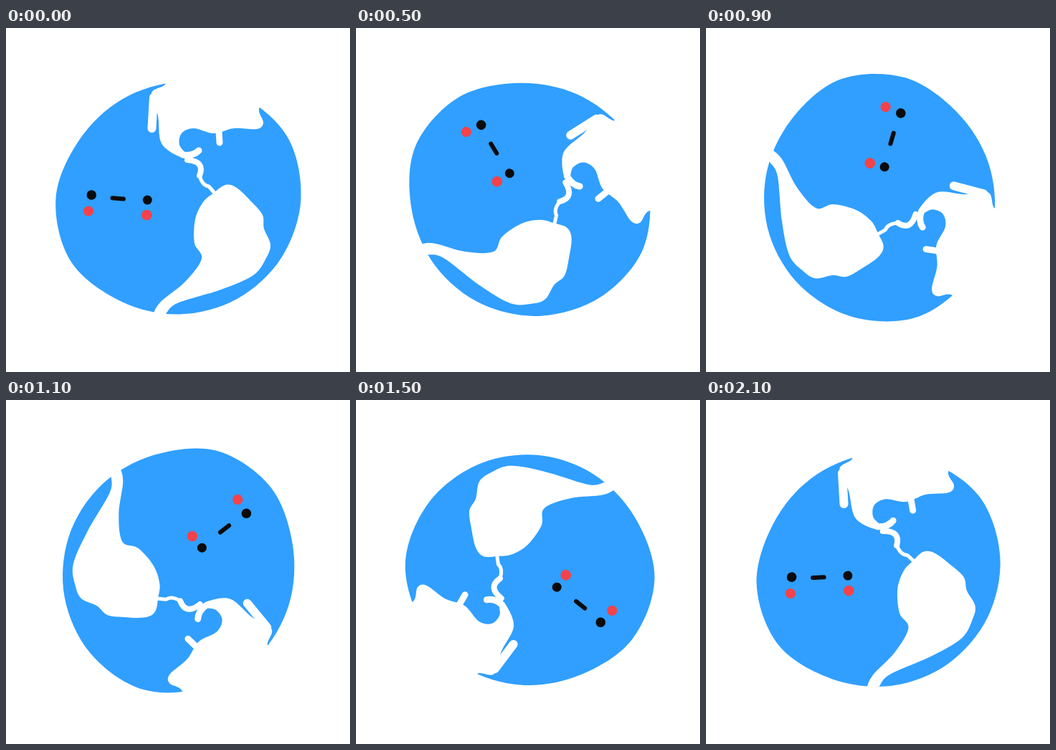
Write an HTML page with a canvas that moves like this. It is 480 px wide and 480 px high and loops after 2200 ms.

```html
<!DOCTYPE html>
<html lang="en">
<head>
<meta charset="utf-8">
<title>Spinning globe</title>
<style>
  html, body { margin: 0; width: 100%; height: 100%; overflow: hidden; background: #fff; }
  canvas { display: block; }
</style>
</head>
<body>
<canvas id="stage" width="480" height="480"></canvas>
<script>
const ctx = document.getElementById('stage').getContext('2d');
const LOOP = 2200, STEP = 100, CX = 242, CY = 238;
const BLUE = '#309fff', WHITE = '#fff', INK = '#0b0b0c', BLUSH = '#f3424a';

// Key poses of the spin: [step, degrees].
const spin = [[0, 0], [5, 54.4], [9, 101.7], [13, 172.7], [18, 275.2], [21, 353.4], [22, 360]];

// The wobbly globe: one radius every 30 degrees.
const radii = [169.5, 164.5, 161.5, 161.5, 165, 175, 172.5, 162, 160, 162.5, 167, 173.5];
const globe = smooth(radii.map((r, i) => {
  const a = i * Math.PI / 6;
  return [CX + r * Math.cos(a), CY + r * Math.sin(a)];
}));

const northLand = smooth([
  [222, 79], [203, 91], [212, 122], [217, 161], [243, 180], [251, 176], [242, 163], [245, 147],
  [262, 140], [290, 147], [318, 140], [350, 141], [359, 132], [353, 113], [366, 90], [300, 55], [228, 62]
]);

const southLand = smooth([
  [290, 230], [306, 219], [322, 223], [343, 243], [358, 261], [360, 280], [369, 302], [363, 321],
  [345, 345], [300, 365], [239, 384], [221, 400], [206, 402], [215, 383], [250, 354], [273, 322],
  [263, 300], [264, 267], [275, 243]
]);

// Closed Catmull-Rom curve through the points.
function smooth(points) {
  const n = points.length, path = new Path2D();
  const at = i => points[(i + n) % n];
  path.moveTo(...at(0));
  for (let i = 0; i < n; i++) {
    const [a, b, c, d] = [at(i - 1), at(i), at(i + 1), at(i + 2)];
    path.bezierCurveTo(
      b[0] + (c[0] - a[0]) / 6, b[1] + (c[1] - a[1]) / 6,
      c[0] - (d[0] - b[0]) / 6, c[1] - (d[1] - b[1]) / 6, ...c);
  }
  path.closePath();
  return path;
}

function fill(path, color) {
  ctx.fillStyle = color;
  ctx.fill(path);
}

function brush(d, width, color) {
  ctx.strokeStyle = color;
  ctx.lineWidth = width;
  ctx.stroke(new Path2D(d));
}

function dot(x, y, r, color) {
  const path = new Path2D();
  path.arc(x, y, r, 0, Math.PI * 2);
  fill(path, color);
}

function angleAt(step) {
  const i = spin.findIndex(([s]) => s > step);
  const [s0, a0] = spin[i - 1], [s1, a1] = spin[i];
  return (a0 + (a1 - a0) * (step - s0) / (s1 - s0)) * Math.PI / 180;
}

function drawLand() {
  fill(northLand, WHITE);
  fill(southLand, WHITE);
  brush('M206 97L203.5 140', 12, WHITE);             // west peninsula
  brush('M297 143L298 160', 9, WHITE);               // east peninsula
  brush('M247 177Q261 179 269 171', 9, WHITE);       // hook around the gulf
  brush('M253 184Q278 186 270 206', 8, WHITE);       // isthmus, wide then narrow
  brush('M270 206Q274 220 283 221L290 229', 5, WHITE);
}

function drawFace() {
  dot(119.3, 233, 6.8, INK);
  dot(197.3, 240, 6.5, INK);
  dot(115, 255.5, 7.1, BLUSH);
  dot(196.3, 261, 7.3, BLUSH);
  brush('M148.5 237.2L164 238.4', 6, INK);
}

function draw(now) {
  ctx.setTransform(1, 0, 0, 1, 0, 0);
  ctx.fillStyle = WHITE;
  ctx.fillRect(0, 0, 480, 480);
  ctx.translate(CX, CY);
  ctx.rotate(angleAt(Math.floor(now % LOOP / STEP)));
  ctx.translate(-CX, -CY);
  ctx.lineCap = ctx.lineJoin = 'round';
  fill(globe, BLUE);
  drawLand();
  drawFace();
}

const start = performance.now();
function tick() {
  draw(performance.now() - start);
  requestAnimationFrame(tick);
}
tick();
</script>
</body>
</html>
```
